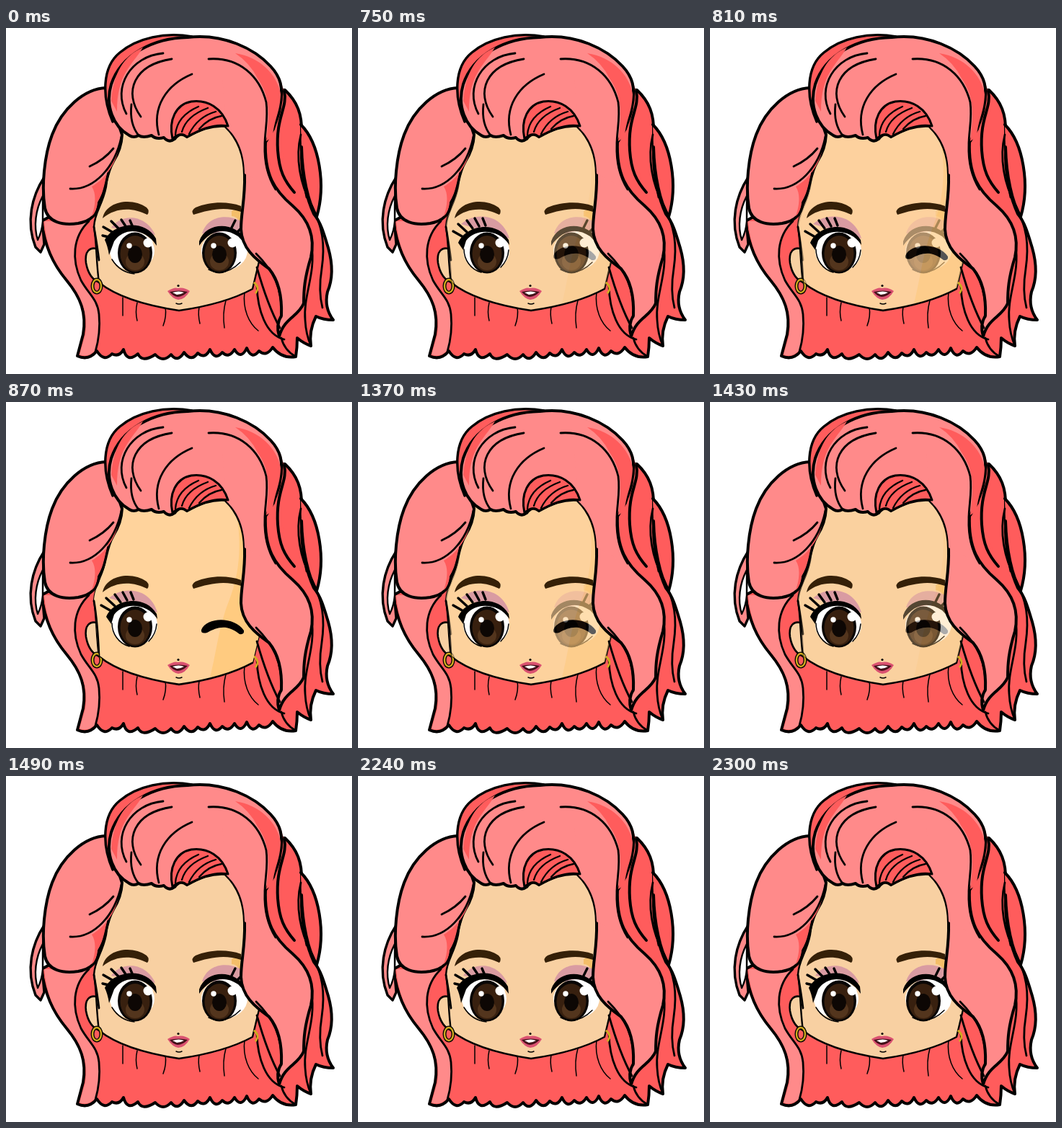
Write an HTML page that moves like this. It is 480 px wide and 480 px high and loops after 2.36 s.

```html
<!DOCTYPE html>
<html lang="en">
<head>
<meta charset="utf-8">
<title>Wink</title>
<style>
html, body { margin: 0; width: 100%; height: 100%; overflow: hidden; background: #fff; }
svg { display: block; width: 100vw; height: 100vh; }
.ink { stroke: #000; stroke-width: 4; stroke-linejoin: round; stroke-linecap: round; }
.line { fill: none; stroke-width: 2.8; }
.thin { fill: none; stroke-width: 1.5; }
.light { fill: #ff8a8a; }
.dark { fill: #ff5c5c; }
.skin { fill: #f8d0a2; }
.shadow { fill: #d99ba2; }
.brow { fill: #352008; }
.lash { fill: none; stroke: #000; stroke-width: 3.4; stroke-linecap: round; }
.gold { fill: none; stroke: #000; stroke-width: 5; }
.gold + .gold { stroke: #d1ac20; stroke-width: 2.4; }

.wink { opacity: 0; animation: wink 2360ms step-end infinite; }
.rest { animation: rest 2360ms step-end infinite; }
.wide { opacity: 0; animation: wide 2360ms step-end infinite; }
@keyframes wink {
  0% { opacity: 0; }
  31.78% { opacity: .35; }
  34.322% { opacity: .67; }
  36.864% { opacity: 1; }
  58.051% { opacity: .64; }
  60.593% { opacity: .33; }
  63.136%, 100% { opacity: 0; }
}
@keyframes rest {
  0%, 63.136%, 100% { opacity: 1; }
  31.78% { opacity: 0; }
}
@keyframes wide {
  0%, 63.136%, 100% { opacity: 0; }
  31.78% { opacity: 1; }
}
</style>
</head>
<body>
<svg viewBox="0 0 480 480" xmlns="http://www.w3.org/2000/svg">
<defs>
  <path id="face" d="M160 145C155 178 141 192 139 220C134 246 123 255 122 276C126 300 125 325 129 353C155 374 194 385 240 392C282 386 318 375 342 362L352 320L350 145L300 120H200Z"/>
  <clipPath id="inFace"><use href="#face"/></clipPath>
  <g id="iris">
    <ellipse rx="24" ry="28.5" fill="#080504"/>
    <ellipse cy="1" rx="20.5" ry="25" fill="#38200f"/>
    <ellipse cy="12" rx="13" ry="12" fill="#53351d"/>
    <ellipse cy="2" rx="10" ry="12" fill="#0d0704"/>
    <circle cx="18" cy="-14" r="6.5" fill="#fff"/>
    <circle cx="-8" cy="-10" r="3.7" fill="#fff"/>
  </g>
</defs>

<!-- back hair -->
<path class="ink dark" d="M120 230L49 268C54 302 64 326 84 350C104 374 112 396 107 425L99 455Q115 462 126 448Q136 464 147 452Q157 457 163 446Q168 465 183 452Q189 465 207 453Q218 465 229 453Q238 465 247 450Q257 464 266 451Q276 460 283 446Q290 462 300 450Q309 459 317 446Q326 461 334 444Q341 461 351 448Q361 457 370 443Q382 459 402 456Q404 443 404 430Q412 437 423 441Q420 420 430 400Q440 405 454 405Q441 388 446 366Q457 340 447 305C441 285 437 270 427 258C418 238 411 215 410 180V145C411 120 404 102 387 86L300 80Z"/>
<path class="ink dark" d="M409 134C435 160 444 218 431 262C419 242 411 205 410 165"/>
<path class="ink line" d="M410 168C411 192 412 212 417 235"/>
<path class="light" d="M53 268C56 302 66 325 86 349C106 374 114 396 110 425L102 453Q114 458 124 447C130 425 132 398 125 379C112 360 91 337 98 300Q101 282 115 268Z"/>
<path class="ink line" d="M115 268C92 290 91 322 104 350C115 370 127 376 129 397C131 418 128 435 124 449"/>
<path class="ink light" style="stroke-width:3.4" d="M53 207C36 233 27 269 41 304L48 311L53 300L50 265Z"/>
<path class="ink" style="stroke-width:2.4" fill="#fff" d="M51 233C41 252 38 275 44 294Q50 282 51 268Z"/>
<path class="ink thin" d="M162 374V399M182 381Q179 394 182 406M221 387Q223 400 218 413M268 387Q266 398 269 410M305 378Q300 396 303 416M331 366C328 390 337 410 350 420"/>
<path class="ink line" d="M348 358C349 390 360 426 386 432M382 430Q386 447 402 456"/>

<!-- ear and face -->
<path class="ink skin" style="stroke-width:2.6" d="M129 307C115 302 109 311 111 326Q115 348 130 353"/>
<use href="#face" class="ink skin" style="stroke-width:2.4"/>
<path class="ink line" d="M122 276Q127 305 129 322"/>
<path fill="#f4be69" d="M313 254Q320 250 325 254V270Q320 261 313 261Z"/>
<ellipse class="gold" cx="126" cy="358" rx="6" ry="9"/><ellipse class="gold" cx="126" cy="358" rx="6" ry="9"/>
<path class="gold" d="M344 353Q353 360 346 368"/><path class="gold" d="M344 353Q353 360 346 368"/>

<!-- right eye, open -->
<path class="shadow" d="M272 285C279 261 306 257 326 268V285Z"/>
<ellipse cx="303" cy="309" rx="32" ry="27" fill="#fff"/>
<use href="#iris" x="296" y="312"/>
<path d="M268 296C277 269 318 267 333 295L337 306Q327 294 322 289C304 277 284 279 268 302Z"/>
<path class="lash" d="M312 279L318 267M321 283L331 273M328 290L342 284"/>
<path class="ink thin" d="M281 335Q304 346 325 325"/>

<!-- closed lid over the face -->
<g class="wink" clip-path="url(#inFace)">
  <path fill="#ffd39c" d="M120 120H360V395H120Z"/>
  <path fill="#ffcb80" d="M318 145C327 190 326 233 310 274C294 314 292 350 281 390L360 390V145Z"/>
  <path d="M271 316C278 298 317 297 330 317Q331 323 324 322C307 308 293 312 279 320Q270 322 271 316Z"/>
  <path class="ink line" d="M122 276Q127 305 129 353C155 374 194 385 240 392C282 386 318 375 342 362"/>
</g>

<!-- left eye -->
<g class="rest">
  <path class="shadow" d="M146 277C158 258 193 256 207 287Z"/>
  <ellipse cx="175" cy="309" rx="31" ry="27" fill="#fff"/>
  <use href="#iris" x="179" y="312"/>
  <path d="M137 294C149 270 193 264 208 292L209 302C194 278 164 275 150 296L143 315Q141 302 137 294Z"/>
  <path class="lash" d="M147 291L134 288M149 284L135 276M157 279L146 268M166 275L160 266M175 274L172 267"/>
  <path class="ink thin" d="M147 321Q158 339 178 341"/>
</g>
<g class="wide">
  <path class="shadow" d="M143 272C160 256 199 255 210 292Z"/>
  <ellipse cx="178" cy="309" rx="32" ry="29" fill="#fff"/>
  <use href="#iris" x="179" y="312"/>
  <path d="M139 298C149 273 193 266 209 294L210 301C196 279 164 277 150 295L146 308Z"/>
  <path class="lash" d="M146 290L132 282M151 283L139 272M159 278L151 267M168 275L162 264M177 274L173 264"/>
  <path class="ink thin" d="M147 307C147 321 156 335 171 339M198 332Q208 322 209 308"/>
</g>

<!-- brows, nose, mouth -->
<path class="brow" d="M134 264C139 239 176 235 195 249Q200 254 196 259C176 249 153 248 134 264Z"/>
<path class="brow" d="M260 259Q256 253 263 249C282 241 307 240 326 247V255C303 247 282 252 260 259Z"/>
<circle cx="239" cy="357.5" r="1.6"/>
<path fill="#da5271" d="M224 365Q234 359 238 361Q247 359 255 365Q248 377 239 377Q231 376 224 365Z"/>
<path fill="#421018" d="M227 366Q240 363 252 366Q245 373 238 373Q232 372 227 366Z"/>
<path fill="#fff" d="M231 367Q240 364 247 367Q242 370 237 370Z"/>
<path class="ink thin" d="M236 382Q240 384 244 382"/>

<!-- left side lock -->
<path class="ink light" d="M139 83C108 84 77 113 64 148C53 177 49 220 54 250C58 270 79 274 100 271C118 268 127 259 129 242C140 225 137 205 149 185Q160 168 161 148Z"/>
<path class="dark" d="M158 158C154 188 139 208 119 220Q128 234 119 261Q126 255 127 241C139 224 136 204 147 184Q158 170 158 158Z"/>
<path class="ink line" d="M89 223C122 225 151 194 160 151M116 192Q136 183 149 167"/>

<!-- right locks -->
<path class="dark" d="M320 40L381 72L386 90C375 120 378 175 400 225L390 260L340 180Z"/>
<path class="ink line" style="stroke-width:4" d="M386 87C391 112 374 122 377 170C379 198 386 212 400 228"/>
<path class="ink line" d="M409 148C401 180 408 217 424 246C439 275 443 300 438 334Q433 365 439 388M424 302C430 340 412 372 415 405Q416 425 423 441"/>
<path class="ink light" d="M300 60L345 58C368 90 361 126 360 157C358 203 372 225 398 247C421 267 429 290 423 318C414 347 413 364 413 382C405 401 386 402 379 428Q374 412 382 399C383 375 379 351 365 334C345 320 327 305 326 279C326 256 332 236 331 204C331 177 322 153 305 137Z"/>
<path class="ink line" d="M347 313C370 336 384 360 382 401M348 332Q363 385 380 416"/>

<!-- crown -->
<path class="ink dark" style="stroke-width:3.4" d="M148 130C133 96 133 54 158 34C182 14 221 5 258 12L225 60Z"/>
<path class="ink light" d="M171 149C149 137 137 108 146 78C160 36 205 14 252 13C302 7 345 29 367 53C380 67 386 82 380 110C379 121 373 132 371 140L361 157L331 170C325 149 314 138 306 136C284 134 267 142 251 151Q242 143 234 154Q226 160 219 152Q208 155 202 149Q190 153 184 149Q177 153 171 149Z"/>
<path class="dark" d="M318 35C352 40 377 65 381 92C380 118 372 126 370 151L361 157C365 125 368 96 349 70Q338 48 318 35Z"/>
<path class="dark" d="M146 101C149 62 164 38 190 27C174 53 154 64 154 116Z"/>
<path class="light" d="M300 70H343C361 94 359 126 358 157C356 194 365 213 376 226L331 202C331 170 319 150 306 138Z"/>
<path class="ink line" d="M281 43C324 40 352 67 361 103C364 126 359 142 359 162C358 187 364 208 374 224"/>
<path class="ink line" d="M167 119C147 82 173 39 218 35M187 123C162 88 178 51 230 43M212 148C202 110 222 79 258 64M184 149Q171 133 174 106"/>
<path class="ink dark" style="stroke-width:3" d="M231 154C225 127 236 106 257 102C280 99 300 111 308 136C287 132 266 143 251 151Q242 143 231 154Z"/>
<path class="ink line" style="stroke-width:2.3" d="M235 148Q237 122 267 109M244 144Q250 122 280 111M254 147Q266 123 291 116M268 140Q281 125 299 122"/>
</svg>
</body>
</html>
```
